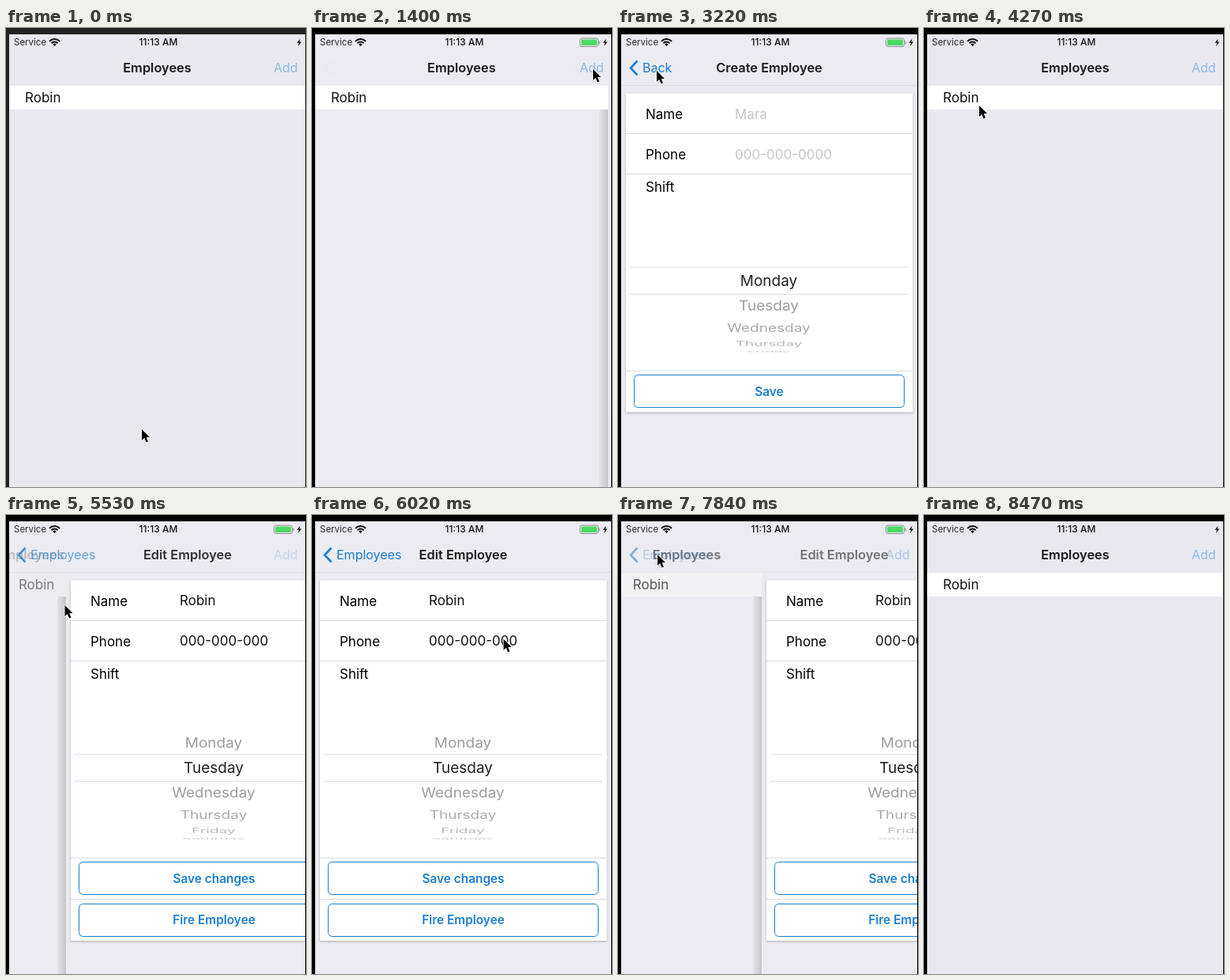
An HTML page with a canvas for the animation above (8960 ms loop, 380 by 580 pixels).

```html
<!DOCTYPE html>
<html lang="en">
<head>
<meta charset="utf-8">
<style>
html, body { margin: 0; width: 100%; height: 100%; overflow: hidden; background: #000; }
canvas { display: block; }
</style>
</head>
<body>
<canvas id="stage" width="380" height="580"></canvas>
<script>
const ctx = document.getElementById('stage').getContext('2d');
const LOOP = 8960, WIDTH = 375, BLUE = '#1c7ed0';
const DAYS = ['Monday', 'Tuesday', 'Wednesday', 'Thursday', 'Friday', 'Saturday', 'Sunday'];
const NAME = 'Robin', PHONE = '000-000-000';

// Each visit to a form: push time, pop time and contents
const VISITS = [
  { push: 1390, pop: 3250, title: 'Create Employee', back: 'Back', day: 0, buttons: ['Save'] },
  { push: 5340, pop: 7740, title: 'Edit Employee', back: 'Employees', day: 1,
    buttons: ['Save changes', 'Fire Employee'], filled: true }
];

// Pointer stops: time, x, y
const POINTER = [
  [0, 172, 507], [70, 172, 507], [950, 352, 50], [1400, 356, 52], [1890, 356, 52],
  [3120, 49, 54], [3500, 49, 54], [4200, 70, 98], [4270, 70, 98], [4830, 71, 105],
  [5040, 71, 105], [5400, 74.5, 114], [5600, 74.5, 114], [6100, 255, 160], [6250, 255, 160],
  [6720, 205, 510], [7280, 88.5, 88], [7550, 50, 50], [8000, 50, 50], [8420, -30, 60], [LOOP, -30, 60]
];

const spring = ms => {
  const k = Math.max(0, ms) * 0.016;
  return 1 - (1 + k) * Math.exp(-k);
};

function text(str, x, y, { size = 17, weight = 400, color = '#111', align = 'left', alpha = 1 } = {}) {
  ctx.save();
  ctx.globalAlpha = Math.max(0, Math.min(1, alpha));
  ctx.font = `${weight} ${size}px Inter, "Liberation Sans", sans-serif`;
  ctx.textAlign = align;
  ctx.textBaseline = 'middle';
  ctx.fillStyle = color;
  ctx.fillText(str, x, y);
  const w = ctx.measureText(str).width;
  ctx.restore();
  return w;
}

function rect(x, y, w, h, color) {
  ctx.fillStyle = color;
  ctx.fillRect(x, y, w, h);
}

function poly(points, color) {
  ctx.beginPath();
  points.forEach(([x, y]) => ctx.lineTo(x, y));
  ctx.closePath();
  ctx.fillStyle = color;
  ctx.fill();
}

function box(x, y, w, h, r, color, fill) {
  ctx.beginPath();
  ctx.roundRect(x, y, w, h, r);
  ctx[fill ? 'fillStyle' : 'strokeStyle'] = color;
  ctx.lineWidth = 1;
  fill ? ctx.fill() : ctx.stroke();
}

function statusBar(showBattery) {
  text('Service', 10, 18.5, { size: 11.5, color: '#2b2b2e' });
  text('11:13 AM', 193, 18.5, { size: 12, weight: 500, align: 'center' });
  ctx.strokeStyle = '#111';
  ctx.lineWidth = 2;
  for (const r of [5.5, 9]) {
    ctx.beginPath();
    ctx.arc(61.5, 23, r, -Math.PI * 0.76, -Math.PI * 0.24);
    ctx.stroke();
  }
  ctx.beginPath();
  ctx.moveTo(61.5, 23);
  ctx.arc(61.5, 23, 3.2, -Math.PI * 0.76, -Math.PI * 0.24);
  ctx.fillStyle = '#111';
  ctx.fill();
  if (showBattery) {
    box(339.5, 13, 23, 10.5, 2.5, '#8d8d92');
    box(341, 14.5, 20, 7.5, 1.5, '#4cd964', true);
    rect(363.5, 16.5, 1.2, 4, '#8d8d92');
  }
  poly([[372.5, 13.5], [368.5, 18.7], [371, 18.7], [370, 23], [374.2, 17.4], [371.6, 17.4]], '#111');
}

function wheel(selected) {
  const step = 20.5 * Math.PI / 180;
  DAYS.forEach((day, i) => {
    const d = i - selected;
    if (Math.abs(d) > 4) return;
    ctx.save();
    ctx.translate(191, 320.5 + 90 * Math.sin(d * step));
    ctx.scale(1, Math.cos(d * step));
    text(day, 0, 0, {
      size: 19, align: 'center',
      color: d ? '#8e8e8e' : '#222', alpha: d ? 1 - 0.13 * Math.abs(d) : 1
    });
    ctx.restore();
  });
  for (const y of [302, 336]) rect(15, y, 353, 1, '#e0e0e0');
}

function form(v, offset, t) {
  ctx.save();
  ctx.translate(offset, 0);
  if (offset) {
    const g = ctx.createLinearGradient(-7, 0, 4, 0);
    g.addColorStop(0, 'rgba(0,0,0,.03)');
    g.addColorStop(1, 'rgba(0,0,0,.17)');
    rect(-7, 103, 11, 477, g);
  }
  rect(4, 73, WIDTH, 507, '#ebebf1');

  const bottom = 433 + 52.5 * v.buttons.length;
  ctx.save();
  ctx.shadowColor = 'rgba(0,0,0,.28)';
  ctx.shadowBlur = 3;
  ctx.shadowOffsetY = 1;
  box(10, 82.5, 363.5, bottom - 82.5, 1, '#fff', true);
  ctx.restore();
  for (const y of [133, 184]) rect(10, y, 363, 1, '#dcdcdf');

  text('Name', 35, 109.5, { color: '#000' });
  text('Phone', 35, 160.5, { color: '#000' });
  text('Shift', 35, 202, { color: '#000' });
  if (v.filled) {
    text(NAME, 148, 108.5);
    const w = text(PHONE, 148, 159.5);
    if (t > 6200 && t < v.pop && (t - 6200) % 1060 < 530) rect(148 + w, 149, 1.5, 20, '#3f6bd8');
  } else {
    text('Mara', 148, 109.5, { color: '#c7c7cc' });
    text('000-000-0000', 148, 160.5, { color: '#c7c7cc' });
  }
  wheel(v.day);
  v.buttons.forEach((label, i) => {
    const y = 433 + i * 52.5;
    rect(10, Math.floor(y), 363, 1, '#dcdcdf');
    box(20.5, Math.round(y) + 5.5, 342, 41, 5, BLUE);
    text(label, 191.5, y + 27, { size: 15.4, weight: 600, color: BLUE, align: 'center' });
  });
  ctx.restore();
}

// away: 1 when the list is fully shown, 0 when the form covers it
function navBar(v, away) {
  const title = { size: 16.4, weight: 600, color: '#1a1a1c', align: 'center' };
  const shown = 1 - away;
  text('Employees', 191.5 - 199 * shown, 51, { ...title, alpha: away * 1.2 });
  text('Add', 339, 51, { size: 16, color: '#2f8be0', alpha: 0.5 * Math.sqrt(away) });
  if (!v) return;
  text(v.title, 191.5 + 200 * away, 51, { ...title, alpha: shown * 1.1 });
  text(v.back, 31, 51, { size: 16, color: BLUE, alpha: shown * shown });
  ctx.save();
  ctx.globalAlpha = shown;
  ctx.strokeStyle = BLUE;
  ctx.lineWidth = 2.6;
  ctx.beginPath();
  ctx.moveTo(24.5, 41.5);
  ctx.lineTo(16, 50.5);
  ctx.lineTo(24.5, 59.5);
  ctx.stroke();
  rect(4, 72, WIDTH, 1, '#dcdce2');
  ctx.restore();
}

function list(shown) {
  const shift = -10 * shown;
  const tone = Math.round(255 - 24 * shown);
  rect(4, 73, WIDTH, 30, `rgb(${tone},${tone},${tone + Math.round(5 * shown)})`);
  text(NAME, 24 + shift, 88.5, { alpha: 1 - 0.6 * shown });
}

function pointer(t) {
  const i = POINTER.findIndex(p => p[0] > t);
  const [t0, x0, y0] = POINTER[i - 1], [t1, x1, y1] = POINTER[i];
  const u = (t - t0) / (t1 - t0), s = u * u * (3 - 2 * u);
  ctx.save();
  ctx.translate(x0 + (x1 - x0) * s, y0 + (y1 - y0) * s);
  const arrow = [[0, 0], [0, 14], [3.2, 11], [5.6, 16.5], [8, 15.5], [5.7, 10.2], [10, 10]];
  ctx.lineJoin = 'round';
  ctx.lineWidth = 1.6;
  ctx.strokeStyle = '#fff';
  poly(arrow, '#000');
  ctx.stroke();
  poly(arrow, '#000');
  ctx.restore();
}

function draw(t) {
  const visit = VISITS.find(v => t >= v.push && t < v.pop + 600);
  let offset = WIDTH;
  if (visit) {
    const s = t < visit.pop ? 1 - spring(t - visit.push) : spring(t - visit.pop);
    offset = Math.round(WIDTH * s);
  }
  const active = offset < WIDTH ? visit : null;
  const away = offset / WIDTH;

  rect(0, 0, 380, 580, t < 1390 ? '#232323' : '#000');
  ctx.save();
  ctx.beginPath();
  ctx.rect(4, 8, WIDTH, 572);
  ctx.clip();
  rect(4, 8, WIDTH, 572, active ? '#ebebf1' : '#e9e8ee');
  list(1 - away);
  if (active) form(active, offset, t);
  navBar(active, away);
  statusBar(active);
  ctx.restore();
  pointer(t);
}

const start = performance.now();
function frame() {
  const t = (performance.now() - start) % LOOP;
  draw(Math.floor(t / 70) * 70);
  requestAnimationFrame(frame);
}
frame();
</script>
</body>
</html>
```
